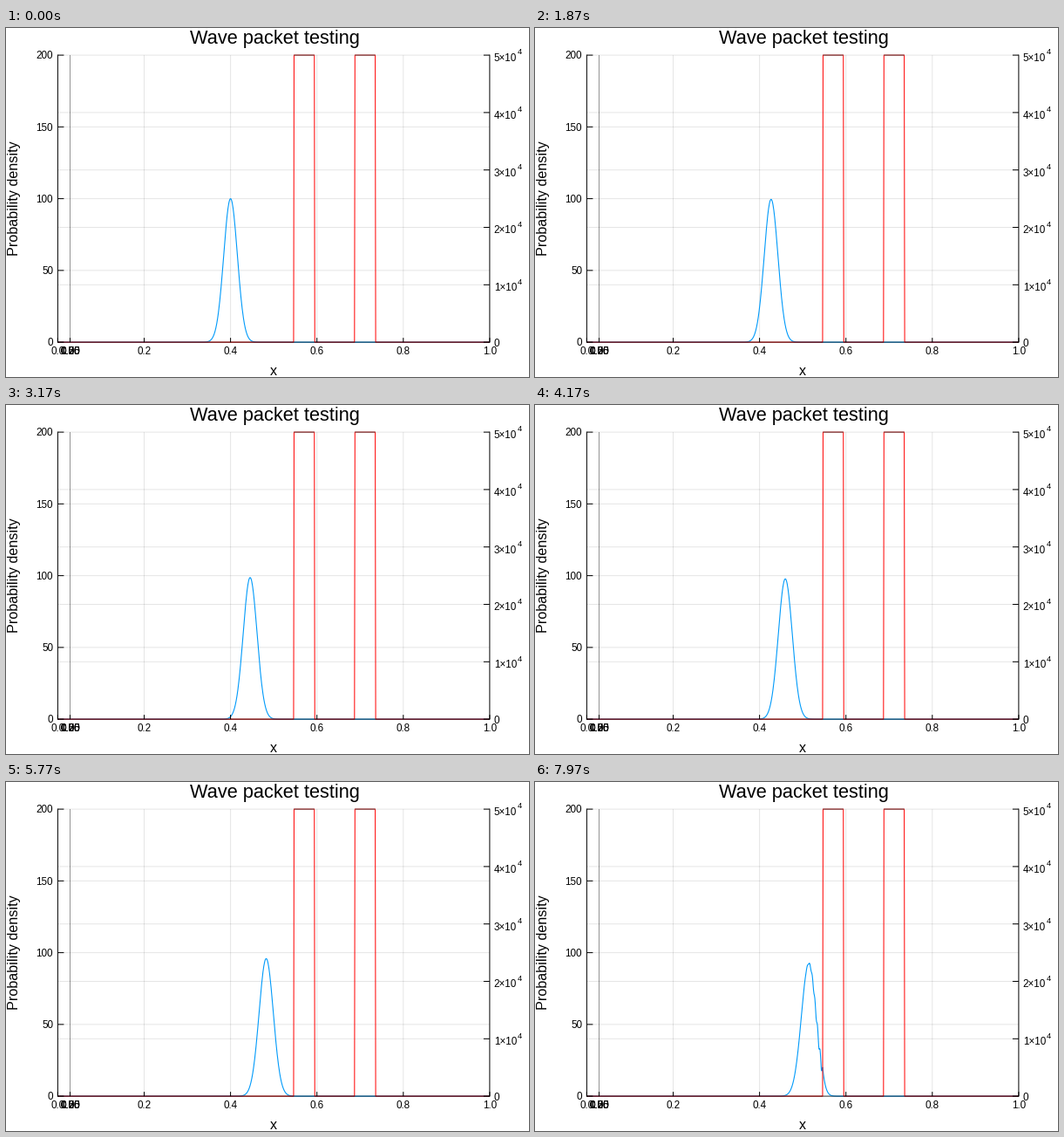
A matplotlib script for the animation above (8000 ms loop, 600 by 400 pixels).

```python
import numpy as np
import matplotlib.pyplot as plt
from matplotlib.animation import FuncAnimation

W, H, DPI = 600, 400, 100
FRAMES, LOOP_MS = 240, 8000
LEFT, RIGHT, TOP, BASE = 59.4, 554.9, 31.1, 360.1
V_MAX = 5e4
BLUE, RED = "#009afa", "#ff0000"

plt.rcParams["font.family"] = "Liberation Sans"


def px(x):
    return LEFT + (RIGHT - LEFT) * x


def py(frac):
    return BASE - (BASE - TOP) * frac


def barrier(x):
    first = (x > 0.5465) & (x < 0.5945)
    second = (x > 0.6875) & (x < 0.7355)
    return np.where(first | second, V_MAX, 0.0)


def evolve(x, v, dt=1e-6, k=500):
    """Crank-Nicolson solution of the Schroedinger equation."""
    n, dx = len(x), x[1] - x[0]
    off = np.full(n - 1, -0.5 / dx**2)
    ham = np.diag(1 / dx**2 + v) + np.diag(off, 1) + np.diag(off, -1)
    eye = np.eye(n)
    step = np.linalg.solve(eye + 0.5j * dt * ham, eye - 0.5j * dt * ham)
    psi = 10 * np.exp(-(x - 0.4) ** 2 / 1e-3 + 1j * k * x)
    out = []
    for _ in range(FRAMES):
        out.append(np.abs(psi) ** 2)
        psi = step @ psi
    return out


x = np.linspace(0, 1, 1001)
v = barrier(x)
density = evolve(x, v)

fig = plt.figure(figsize=(W / DPI, H / DPI), dpi=DPI, facecolor="white")
ax = fig.add_axes([0, 0, 1, 1])
ax.set_xlim(0, W)
ax.set_ylim(H, 0)
ax.axis("off")


def line(xs, ys, color="black", width=1.0, **kw):
    kw.setdefault("solid_capstyle", "butt")
    return ax.plot(xs, ys, color=color, lw=width * 72 / DPI, snap=False, **kw)[0]


def label(tx, ty, s, size=11.6, ha="center", **kw):
    kw.setdefault("va", "baseline")
    ax.text(tx, ty, s, fontsize=size * 72 / DPI, ha=ha, color="black", **kw)


def grid(xs, ys):
    line(xs, ys, alpha=0.1, zorder=1)


# Grid, ticks and tick labels
for i in range(6):
    gx = px(i / 5)
    if 0 < i < 5:
        grid([gx, gx], [TOP, BASE])
    line([gx, gx], [BASE, BASE - 5], zorder=5)
    label(gx, 374.4, f"{i / 5:.1f}")

for i in range(5):
    gy = py(i / 4)
    if i < 4:
        grid([LEFT, RIGHT], [gy, gy])
    line([LEFT, LEFT + 7], [gy, gy], zorder=5)
    label(54, gy + 4.3, str(50 * i), ha="right")

for i in range(6):
    gy = py(i / 5)
    grid([LEFT, RIGHT], [gy, gy])
    line([RIGHT - 7, RIGHT], [gy, gy], zorder=5)
    if i == 0:
        label(560, gy + 4.8, "0", ha="left")
    else:
        label(559.8, gy + 6.8, f"{i}×10", ha="left")
        label(586.5, gy - 0.8, "4", size=9.5, ha="left")

# Squeezed second x axis: all its ticks share one place
for i in range(5):
    grid([73.5, 73.5], [TOP, BASE])
    label(73.6, 374.4, f"{i / 4:.2f}")
line([73.5, 73.5], [BASE, BASE - 5], zorder=5)

# Curves
wave = line([], [], BLUE, 1.1, zorder=3)
line(px(x), py(v / V_MAX), RED, zorder=4)
for a, b in ((0.547, 0.594), (0.688, 0.735)):
    line([px(a), px(b)], [TOP, TOP], "#5a5a5a", zorder=5)

# Axis lines
line([LEFT, LEFT], [TOP - 0.5, BASE + 0.5], zorder=6)
line([RIGHT, RIGHT], [TOP - 0.5, BASE + 0.5], zorder=6)
line([LEFT, RIGHT], [BASE, BASE], alpha=0.7, zorder=6)

label(308, 18.2, "Wave packet testing", size=21.8)
label(307, 398, "x", size=16)
label(14, 195.5, "Probability density", size=16.1, rotation=90, ha="right",
      va="center", rotation_mode="default")
ax.texts[-1].set_x(17.2)


def draw(i):
    wave.set_data(px(x), py(density[i] / 200))
    return (wave,)


anim = FuncAnimation(fig, draw, frames=FRAMES, interval=LOOP_MS / FRAMES,
                     init_func=lambda: draw(0), repeat=True, repeat_delay=0,
                     blit=False)
plt.show()
```
